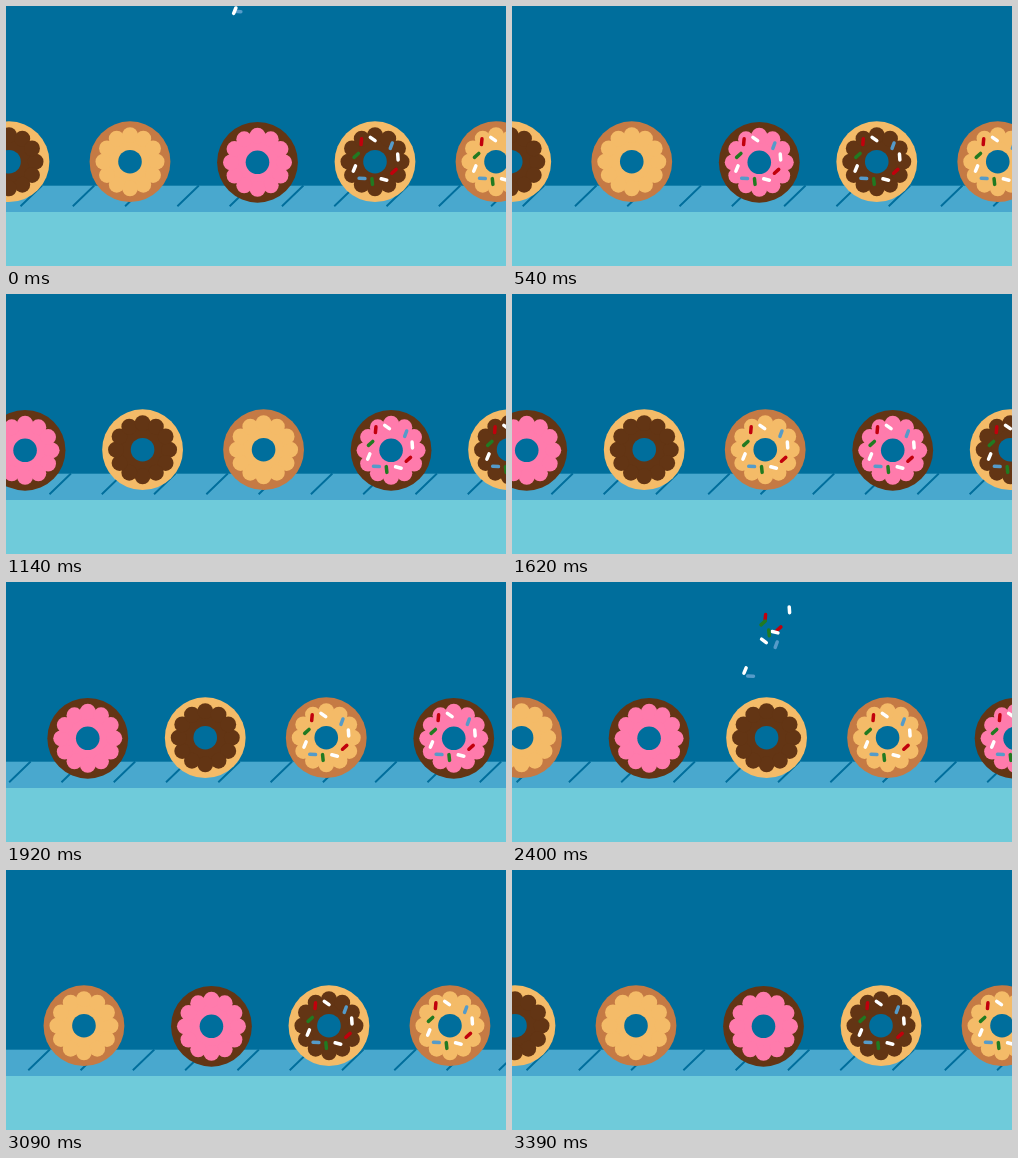
Animation of 500 by 260 pixels, one loop 3420 ms. Source, as an HTML page with a canvas:

```html
<!DOCTYPE html>
<html lang="en">
<head>
<meta charset="utf-8">
<title>Donut belt</title>
<style>
html, body { margin: 0; width: 100%; height: 100%; overflow: hidden; background: #006e9c; }
canvas { display: block; width: 500px; height: 260px; }
</style>
</head>
<body>
<canvas id="stage"></canvas>
<script>
const W = 500, H = 260, LOOP = 3420, STEP = 30;
const WALL = '#006e9c', BELT = '#49a8ce', TABLE = '#6fcbda';
const BROWN = '#633514', CREAM = '#f4bb68', TAN = '#c57a44', PINK = '#ff7bac';
const WHITE = '#ffffff', RED = '#c1000c', GREEN = '#217a21', BLUE = '#559bc9';

const canvas = document.getElementById('stage');
const ctx = canvas.getContext('2d');
const dpr = window.devicePixelRatio || 1;
canvas.width = W * dpr;
canvas.height = H * dpr;

// Belt travel: [ms, px], eased between neighbours
const travel = [
  [0, 0], [510, -5.4], [1070, 133.8], [1605, 129],
  [2200, 252.6], [2770, 249], [3330, 366], [LOOP, 366]
];
const PERIOD = 366;
const LEAD = 5; // ms the belt marks run ahead of the donuts

// One repeat of the row, counted leftwards from the centre;
// nudge is where the sprinkles land off centre
const kinds = [
  { x: 251.5, y: 156.3, nudge: -1.7, dough: BROWN, icing: PINK },
  { x: 124, y: 155.7, nudge: -0.6, dough: TAN, icing: CREAM },
  { x: 3, y: 155.7, nudge: 0, dough: CREAM, icing: BROWN }
];

// Moment the sprinkles drop on each donut
const drops = [0, 1170, 2280];
const FALL = 247, TOP = -10, LAND = 155.7;

// colour, resting x and y, angle in degrees, starting x, delay
const sprinkles = [
  [RED, -13.7, -20, 95, 4.4, 43],
  [GREEN, -18.8, -6.3, -42, 3.8, 41],
  [WHITE, -2.3, -22.7, 36, -3, 1],
  [BLUE, 16.3, -16, -70, 3.3, 0],
  [WHITE, 22.9, -4.7, 86, 22.8, 62],
  [RED, 19, 9.6, -42, 8.9, 40],
  [WHITE, 9, 17.8, 14, 8.3, 39],
  [GREEN, -2.8, 19.8, 84, 5, 39],
  [BLUE, -13, 16.7, 3, -20, -21],
  [WHITE, -20.6, 6.8, -68, -22.8, -21]
];

const lerp = (a, b, p) => a + (b - a) * p;
const clamp = p => Math.max(0, Math.min(1, p));
const ease = p => p * p * (3 - 2 * p);

function beltAt(t) {
  const i = travel.findIndex(k => t < k[0]);
  const [t0, v0] = travel[i - 1], [t1, v1] = travel[i];
  return lerp(v0, v1, ease((t - t0) / (t1 - t0)));
}

function disc(x, y, r, color) {
  ctx.fillStyle = color;
  ctx.beginPath();
  ctx.arc(x, y, r, 0, Math.PI * 2);
  ctx.fill();
}

function drawDonut(x, { y, dough, icing }) {
  disc(x, y, 40.4, dough);
  disc(x, y, 28.5, icing);
  const bumps = 12;
  for (let i = 0; i < bumps; i++) {
    const a = i / bumps * Math.PI * 2;
    disc(x + 26.6 * Math.cos(a), y + 26.6 * Math.sin(a), 7.9, icing);
  }
  disc(x, y, 11.8, WALL);
}

function drawSprinkles(x, nudge, since) {
  ctx.lineCap = 'round';
  ctx.lineWidth = 3.5;
  for (const [color, sx, sy, deg, startX, delay] of sprinkles) {
    const p = clamp((since - delay) / FALL);
    if (!p) continue;
    const cx = x + lerp(startX, sx + nudge, p), cy = lerp(TOP, LAND + sy, p);
    const a = deg * Math.PI / 180, dx = 2.9 * Math.cos(a), dy = 2.9 * Math.sin(a);
    ctx.strokeStyle = color;
    ctx.beginPath();
    ctx.moveTo(cx - dx, cy - dy);
    ctx.lineTo(cx + dx, cy + dy);
    ctx.stroke();
  }
}

function drawBelt(shift) {
  ctx.fillStyle = WALL;
  ctx.fillRect(0, 0, W, H);
  ctx.fillStyle = BELT;
  ctx.fillRect(0, 179.7, W, 27);
  ctx.fillStyle = TABLE;
  ctx.fillRect(0, 206, W, H);
  ctx.strokeStyle = WALL;
  ctx.lineCap = 'butt';
  ctx.lineWidth = 1.9;
  const gap = PERIOD / 7;
  ctx.beginPath();
  for (let x = (66.8 + shift) % gap - gap; x < W; x += gap) {
    ctx.moveTo(x, 200.2);
    ctx.lineTo(x + 21.5, 179.5);
  }
  ctx.stroke();
}

function draw(t) {
  const shift = beltAt(t);
  ctx.setTransform(dpr, 0, 0, dpr, 0, 0);
  drawBelt(beltAt(t + LEAD));
  for (let n = -4; n < 7; n++) {
    const lap = Math.floor(n / 3), kind = kinds[n - lap * 3];
    const x = kind.x - lap * PERIOD + shift;
    if (x < -45 || x > W + 45) continue;
    drawDonut(x, kind);
    if (n < 0) drawSprinkles(x, kind.nudge, LOOP);
    else if (n < 3) drawSprinkles(x, kind.nudge, t - drops[n]);
  }
}

const start = performance.now();
function tick() {
  const t = (performance.now() - start) % LOOP;
  draw(Math.floor(t / STEP) * STEP);
  requestAnimationFrame(tick);
}
tick();
</script>
</body>
</html>
```
